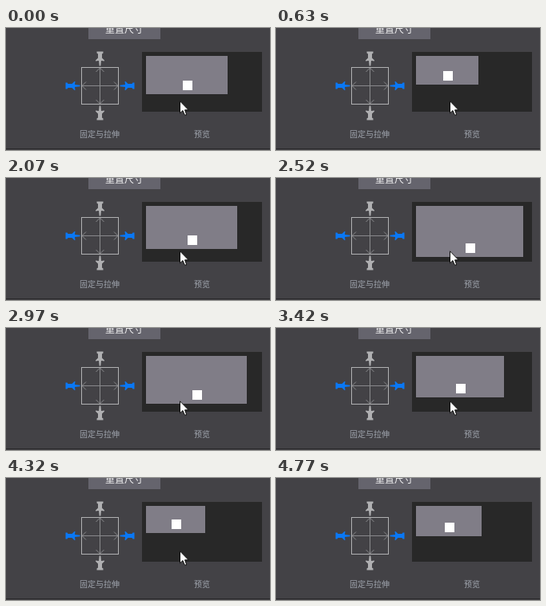
Recreate the animation shown at these times as an HTML page. Size 330 by 153 pixels, loop 4.83 s.

```html
<!DOCTYPE html>
<html lang="zh-CN">
<head>
<meta charset="utf-8">
<title>固定与拉伸</title>
<style>
  html, body { margin: 0; width: 100%; height: 100%; overflow: hidden; background: #434246; }
  svg { display: block; width: 330px; height: 153px; }
  text { font-family: "Noto Sans CJK SC", "Noto Sans CJK", sans-serif; text-anchor: middle; }
  .label { font-size: 10px; fill: #a0a6af; }
  .button { font-size: 12px; fill: #f4f4f4; }
  .pin { fill: #b0b0b2; }
  .pin.on { fill: #0a78f5; }
  .arrow { fill: none; stroke: #89898c; }
  rect { shape-rendering: crispEdges; }
</style>
</head>
<body>
<svg viewBox="0 0 330 153">
  <defs>
    <path id="pin" d="M-4 -43H4V-41L2.5 -40V-35L5.5 -32V-31L1.5 -31.5L.8 -25H-.8L-1.5 -31.5L-5.5 -31V-32L-2.5 -35V-40L-4 -41Z"/>
    <path id="chevron" d="M-5 -17.5L0 -22.5L5 -17.5"/>
  </defs>

  <rect width="330" height="153" fill="#434246"/>
  <rect y="151" width="330" height="1" fill="#29292b"/>

  <rect x="103" width="90" height="14" fill="#65646d"/>
  <text class="button" x="148" y="6">重置尺寸</text>

  <g transform="translate(117.5 72.5)">
    <g class="arrow">
      <path d="M-23 0H23M0 -23V23"/>
      <use href="#chevron"/>
      <use href="#chevron" transform="rotate(90)"/>
      <use href="#chevron" transform="rotate(180)"/>
      <use href="#chevron" transform="rotate(270)"/>
    </g>
    <rect x="-23" y="-23" width="46" height="46" fill="none" stroke="#b0b0b2"/>
    <use class="pin" href="#pin"/>
    <use class="pin on" href="#pin" transform="rotate(90)"/>
    <use class="pin" href="#pin" transform="rotate(180)"/>
    <use class="pin on" href="#pin" transform="rotate(270)"/>
  </g>
  <text class="label" x="117" y="137">固定与拉伸</text>

  <rect x="170" y="30" width="150" height="75" fill="#282828"/>
  <rect id="parent" x="175" y="35" fill="#807d87"/>
  <rect id="child" width="12" height="12" fill="#fff"/>
  <text class="label" x="245" y="137">预览</text>

  <path id="cursor" fill="#fff" stroke="#111" stroke-width="1"
    d="M.5 .8V15.8L4 12.5L6.3 18H8.8L6.6 11.8H11.2Z"/>
</svg>
<script>
  const LOOP = 4830, TICK = 90;
  const LOW = 8, RANGE = 17;
  const el = id => document.getElementById(id);
  const set = (node, attrs) => {
    for (const key in attrs) node.setAttribute(key, attrs[key]);
  };
  const parent = el("parent"), child = el("child"), cursor = el("cursor");

  function draw(time) {
    const tick = Math.floor((time % LOOP) / TICK);

    // The resize rests on every seventh tick.
    const step = tick - Math.floor((tick + 6) / 7);
    const phase = Math.abs(step - LOW) % (2 * RANGE);
    const size = phase > RANGE ? 2 * RANGE - phase : phase;
    const w = 70 + 4 * size, h = 32 + 2 * size;

    set(parent, { width: w, height: h });
    // Centred across, pinned to the lower edge.
    set(child, { x: 170 + w / 2, y: 18 + h });

    // The pointer leaves towards the lower right.
    const away = Math.max(0, tick - 48);
    set(cursor, { transform: `translate(${217 + 14.5 * away} ${91 + 22 * away})` });
  }

  const start = performance.now();
  function frame() {
    draw(performance.now() - start);
    requestAnimationFrame(frame);
  }
  frame();
</script>
</body>
</html>
```
